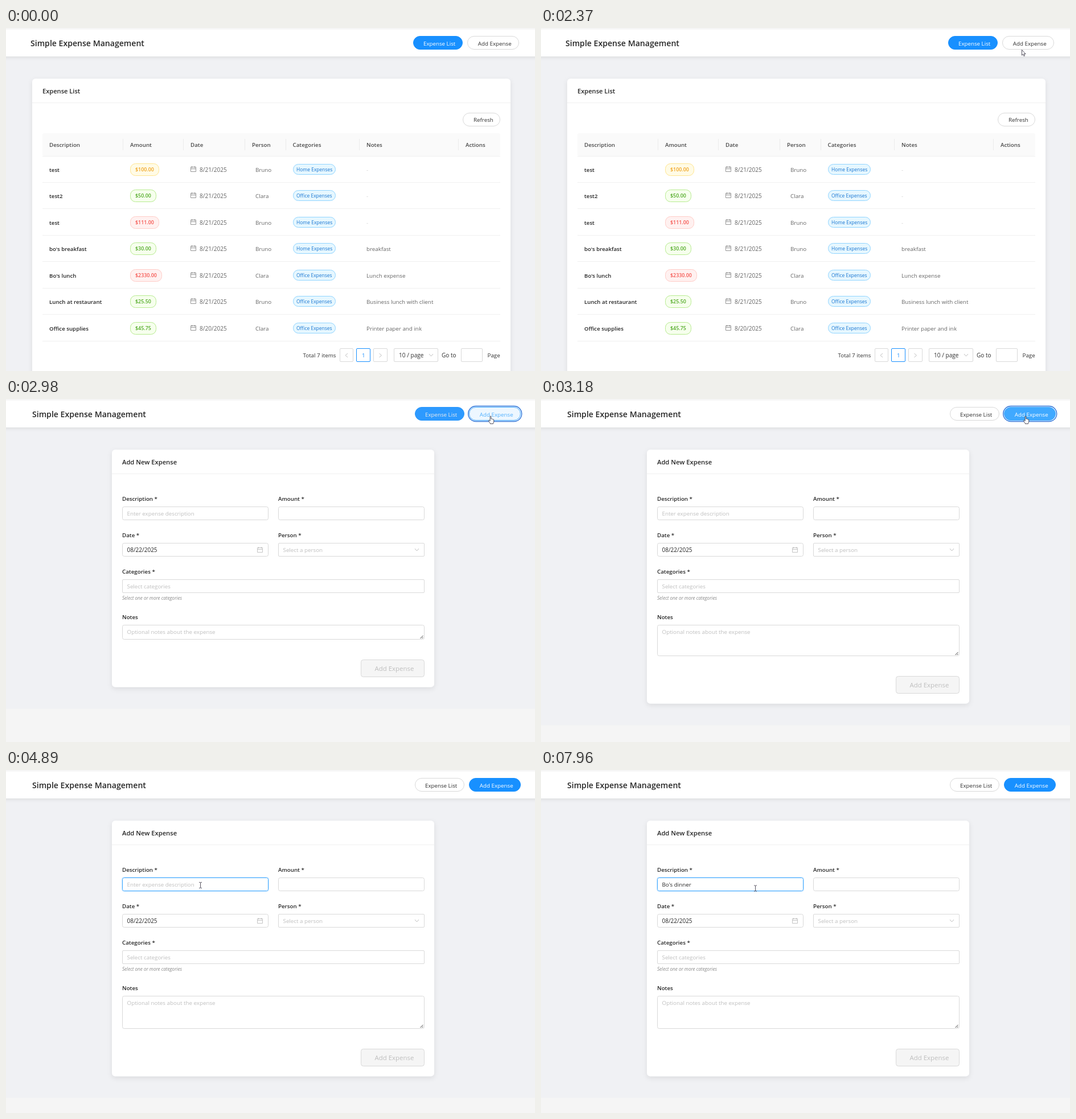
An HTML page for the animation above (8 s loop, 929 px wide and 603 px high).

```html
<!DOCTYPE html>
<html lang="en">
<head>
<meta charset="utf-8">
<title>Simple Expense Management</title>
<style>
html, body { margin: 0; width: 100%; height: 100%; overflow: hidden; background: #f5f5f5; }
svg { display: block; width: 100vw; height: 100vh; }
text { font-family: "Open Sans", "Noto Sans", sans-serif; font-size: 9.8px; white-space: pre; }
.b { font-weight: 600; }
</style>
</head>
<body>
<svg id="stage" viewBox="0 0 929 603" preserveAspectRatio="none"></svg>
<script>
const INK = '#262626', SOFT = '#666', HINT = '#bfbfbf', EDGE = '#d9d9d9';
const BLUE = '#1890ff', LIGHT = '#40a9ff', WHITE = '#ffffff', DARK = '#303030';
const LOOP = 8000, STEP = 200 / 3;

const rect = (x, y, w, h, r, fill, stroke = 'none', more = '') =>
  `<rect x="${x}" y="${y}" width="${w}" height="${h}" rx="${r}" fill="${fill}" stroke="${stroke}" ${more}/>`;
// Outlined box whose one-pixel border sits on whole pixels
const box = (x, y, w, h, r, fill, stroke, more) =>
  rect(x + .5, y + .5, w - 1, h - 1, r, fill, stroke, more);
const text = (x, y, s, fill = INK, size = 9.8, more = '') =>
  `<text x="${x}" y="${y}" fill="${fill}" style="font-size:${size}px" ${more}>${s}</text>`;
const bold = (x, y, s, fill = INK, size = 9.75) => text(x, y, s, fill, size, 'class="b"');
const path = (d, stroke, more = '') => `<path d="${d}" fill="none" stroke="${stroke}" ${more}/>`;
const calendar = (x, y, color) =>
  path(`M${x + .5} ${y + 1.5}h9v8h-9zM${x + .5} ${y + 4.5}h9M${x + 2.5} ${y}v3M${x + 7.5} ${y}v3`, color, 'stroke-width=".9"');
const chevron = (x, y) => path(`M${x} ${y}l3.5 4 3.5-4`, HINT);

// List page
const tones = {
  gold: ['#fffbe6', '#ffe58f', '#f0a422'],
  green: ['#f6ffed', '#b7eb8f', '#4fa823'],
  red: ['#fff1f0', '#ffccc7', '#f5544e']
};
const rows = [
  ['test', '$100.00', 'gold', 'Bruno', '-'],
  ['test2', '$50.00', 'green', 'Clara', '-'],
  ['test', '$111.00', 'red', 'Bruno', '-'],
  ["bo's breakfast", '$30.00', 'green', 'Bruno', 'breakfast'],
  ["Bo's lunch", '$2330.00', 'red', 'Clara', 'Lunch expense'],
  ['Lunch at restaurant', '$25.50', 'green', 'Bruno', 'Business lunch with client'],
  ['Office supplies', '$45.75', 'green', 'Clara', 'Printer paper and ink']
];
const columns = [[76, 'Description'], [218, 'Amount'], [324, 'Date'], [432, 'Person'],
  [503.5, 'Categories'], [633, 'Notes'], [807, 'Actions']];

function row([name, amount, tone, person, note], i) {
  const y = Math.round(248.8 + 46.5 * i), base = y + 4;
  const [bg, edge, ink] = tones[tone];
  const home = i === 0 || i === 2 || i === 3;
  const day = i === 6 ? '8/20/2025' : '8/21/2025';
  return bold(76, base, name, INK, 9.7)
    + box(218, y - 11, 16 + 5 * amount.length, 22, 9, bg, edge)
    + text(227, y + 3, amount, ink, 8.9, 'class="b"')
    + calendar(324, y - 6, '#8c8c8c')
    + text(340, base, day, SOFT, 10.1)
    + text(438, base, person, SOFT)
    + box(504, y - 10, 75, 19, 9, '#e6f7ff', '#91d5ff')
    + text(510, y + 3, (home ? 'Home' : 'Office') + ' Expenses', '#1976d2', 8.48)
    + text(633, base, note, note === '-' ? '#d0d0d0' : SOFT)
    + path(`M64 ${y + 22.5}H868`, '#f0f0f0');
}

function listPage() {
  return rect(46, 89, 840, 530, 6, WHITE, 'none', 'filter="url(#cardShadow)"')
    + bold(64, 115, 'Expense List', INK, 11.1)
    + path('M46 131.5H886', '#f0f0f0')
    + box(802, 149, 66, 24, 11.5, WHITE, EDGE)
    + text(821, 165, 'Refresh', DARK)
    + rect(64, 185, 804, 40, 3, '#fafafa')
    + path('M64 225.5H868', '#f0f0f0')
    + columns.map(([x, s]) => bold(x, 209, s, '#4a4a4a')).join('')
    + [205, 311, 419, 491, 620, 794].map(x => path(`M${x + .5} 195V215`, '#ebebeb')).join('')
    + rows.map(row).join('')
    + text(521.5, 579, 'Total 7 items', DARK)
    + box(586, 563, 24, 24, 1.5, WHITE, EDGE)
    + path('M600 572l-4 3.5 4 3.5', HINT)
    + box(615, 563, 25, 24, 1.5, WHITE, BLUE)
    + text(625, 579, '1', BLUE)
    + box(645, 563, 25, 24, 1.5, WHITE, EDGE)
    + path('M655.5 572l4 3.5-4 3.5', HINT)
    + box(681, 563, 78, 24, 1.5, WHITE, EDGE)
    + text(690, 579, '10 / page', DARK, 10.1)
    + chevron(743, 573)
    + text(765, 579, 'Go to', DARK, 10)
    + box(799, 563, 38, 24, 1.5, WHITE, EDGE)
    + text(845.5, 579, 'Page', DARK);
}

// Form page
const field = (x, y, w, r, more = '') => box(x, y, w, 24, r, WHITE, EDGE, more);

function formPage() {
  return rect(186, 89, 566, 449, 6, WHITE, 'none', 'id="card" filter="url(#cardShadow)"')
    + bold(204, 115, 'Add New Expense', INK, 11.2)
    + path('M186 131.5H752', '#f0f0f0')
    + bold(204, 179, 'Description *') + bold(478, 179, 'Amount *')
    + bold(204, 243, 'Date *') + bold(478, 243, 'Person *')
    + bold(204, 307, 'Categories *') + bold(204, 387, 'Notes')
    + rect(203.5, 188.5, 258, 25, 3.5, 'none', BLUE, 'id="glow"')
    + field(204, 189, 257, 3, 'id="desc"') + field(478, 189, 257, 3)
    + text(212.5, 205, 'Enter expense description', HINT, 9.75, 'id="empty"')
    + text(212.5, 205, '', INK, 9.8, 'id="typed"')
    + rect(0, 195, 1, 13, 0, '#111', 'none', 'id="caret"')
    + field(204, 253, 257, 3) + field(478, 253, 257, 1.5)
    + text(212.5, 269, '08/22/2025', INK, 10)
    + calendar(441, 260, HINT)
    + text(486.5, 269, 'Select a person', HINT)
    + chevron(718, 263)
    + field(204, 317, 531, 1.5)
    + text(212.5, 333, 'Select categories', HINT)
    + text(204, 353, 'Select one or more categories', '#8c8c8c', 8.15, 'font-style="italic"')
    + box(204, 397, 531, 57, 3, WHITE, EDGE, 'id="notes"')
    + text(212.5, 413, 'Optional notes about the expense', HINT)
    + '<g id="below">' + path('M727.5 -2l5-5M730.5 -2l2-2', '#444')
    + box(623, 35, 112, 31, 4, '#f5f5f5', EDGE)
    + text(647.5, 55, 'Add Expense', HINT, 11.45) + '</g>';
}

const stage = document.getElementById('stage');
stage.innerHTML = `<defs>
  <filter id="cardShadow" x="-10%" y="-10%" width="120%" height="120%">
    <feDropShadow dx="0" dy="3" stdDeviation="4.5" flood-opacity=".09"/></filter>
  <filter id="barShadow" x="-5%" y="-30%" width="110%" height="180%">
    <feDropShadow dx="0" dy="1.5" stdDeviation="3" flood-opacity=".1"/></filter></defs>`
  + rect(0, 0, 929, 603, 0, '#f5f5f5')
  + rect(0, 0, 929, 603, 0, '#f0f1f4', 'none', 'id="back"')
  + `<g id="list">${listPage()}</g><g id="form">${formPage()}</g>`
  + rect(-20, -20, 969, 70, 0, WHITE, 'none', 'filter="url(#barShadow)"')
  + path('M0 1.5H929', '#e9e9e9')
  + '<g id="bar">' + bold(43, 32, 'Simple Expense Management', INK, 14.08)
  + rect(808.7, 12.5, 94, 27, 13.5, WHITE, '#2f74d8', 'id="ring" stroke-width="1.4"')
  + box(715, 14, 87, 24, 11.5, BLUE, BLUE, 'id="listBtn"')
  + text(733, 30.5, 'Expense List', WHITE, 9.75, 'id="listTxt"')
  + box(810, 14, 91, 24, 11.5, WHITE, EDGE, 'id="addBtn"')
  + text(828.7, 30.5, 'Add Expense', DARK, 9.8, 'id="addTxt"') + '</g>'
  + `<g id="cursor" stroke-linejoin="round" stroke="#2b2838" stroke-width=".8" fill="#fff">
    <path id="arrow" d="M.4 .4V10L2.6 8.1 4 11.4 5.6 10.7 4.2 7.5H7Z"/>
    <path id="hand" d="M-.9 .6Q0-.7 .9 .6V5Q2 4.2 2.6 5.4 3.7 4.7 4.2 5.9 5.6 5.4 5.7 7V9.6Q5.6 11 4.6 12.2V13.6H-.8V12.4L-3.6 8.6Q-3.8 7-2.4 7.3L-.9 8.6Z"/>
    <path id="beam" fill="none" d="M-2.5-5H-.8L0-4.5 .8-5H2.5M0-4.5V4.5M-2.5 5H-.8L0 4.5 .8 5H2.5"/></g>`;

const el = {};
stage.querySelectorAll('[id]').forEach(n => el[n.id] = n);
const set = (n, attrs) => { for (const k in attrs) n.setAttribute(k, attrs[k]); };
const show = (n, on) => n.setAttribute('visibility', on ? 'visible' : 'hidden');

// Timing
const ramp = (t, a, b) => Math.min(1, Math.max(0, (t - a) / (b - a)));
const smooth = p => p * p * (3 - 2 * p);
const ease = p => p < .5 ? 4 * p ** 3 : 1 - (2 - 2 * p) ** 3 / 2;
const during = (t, a, b) => t >= a && t < b;
function mix(a, b, p) {
  const at = (c, i) => parseInt(c.slice(i, i + 2), 16);
  return `rgb(${[1, 3, 5].map(i => Math.round(at(a, i) + (at(b, i) - at(a, i)) * p))})`;
}

const track = [[630, 837, 321], [690, 832, 181], [900, 832, 181], [1296, 766, 26], [2030, 766, 26],
  [2230, 803, 38.5], [2363, 844, 38], [2520, 851, 41], [2830, 851, 30], [3740, 851, 30],
  [4120, 640, 140], [4360, 372, 231], [4490, 341.5, 202.5], [7700, 341.5, 202.5], [7950, 376.5, 208]];

function pointer(t) {
  const i = track.findIndex(k => k[0] > t);
  if (i < 0) return track[track.length - 1].slice(1);
  const a = track[Math.max(0, i - 1)], b = track[i];
  const p = smooth(ramp(t, a[0], b[0]));
  return [a[1] + (b[1] - a[1]) * p, a[2] + (b[2] - a[2]) * p];
}

function kindAt(x, y, form) {
  const inside = (l, t, r, b) => x > l && x < r && y > t && y < b;
  if (inside(715, 14, 802, 38) || inside(811, 14, 904, 38)) return 'hand';
  if (!form && inside(803, 149, 868, 173)) return 'hand';
  if (form && (inside(204, 189, 460, 213) || inside(478, 189, 734, 213))) return 'beam';
  return 'arrow';
}

const message = "Bo's dinner";
const keys = [5090, 5220, 5830, 5900, 6030, 6430, 6570, 6770, 6900, 7030, 7160];

function draw(t) {
  const q = 630 + Math.floor((t - 625) / STEP) * STEP;
  const form = t >= 2975;
  show(el.list, !form);
  set(el.form, { display: form ? 'inline' : 'none' });
  set(el.bar, { transform: `translate(${form ? 3 : 0})` });

  // Textarea growth moves everything under it
  const bottom = Math.round(422.5 + 32 * ease(ramp(q, 2945, 3245)));
  set(el.notes, { height: bottom - 398 });
  set(el.below, { transform: `translate(0 ${bottom})` });
  set(el.card, { height: bottom + 83.5 - 89 });
  set(el.back, { height: form ? bottom + 121.5 : 603 });

  // Header buttons
  const swap = ramp(q, 2945, 3145);
  const listHover = ramp(q, 1130, 1290) - ramp(q, 2080, 2300);
  const addHover = ramp(q, 2540, 2740), addLeave = ramp(q, 3790, 4000);
  const listFill = mix(BLUE, LIGHT, listHover);
  set(el.listBtn, {
    fill: swap ? mix(BLUE, WHITE, swap) : listFill,
    stroke: swap ? mix(BLUE, EDGE, swap) : listFill
  });
  set(el.listTxt, { fill: mix(WHITE, DARK, swap) });
  const active = mix(LIGHT, BLUE, addLeave);
  set(el.addBtn, {
    fill: swap < 1 ? mix(WHITE, LIGHT, swap) : active,
    stroke: swap < 1 ? mix(EDGE, LIGHT, addHover) : active
  });
  set(el.addTxt, { fill: swap ? mix(LIGHT, WHITE, swap) : mix(DARK, LIGHT, addHover) });
  show(el.ring, during(t, 2905, 4545));

  // Description field
  const focus = ramp(t, 4480, 4620);
  set(el.desc, { stroke: mix(EDGE, LIGHT, focus) });
  set(el.glow, { 'stroke-opacity': .2 * focus });
  const typed = message.slice(0, keys.filter(k => t >= k).length);
  if (el.typed.textContent !== typed) el.typed.textContent = typed;
  el.empty.setAttribute('opacity', typed ? 0 : 1);
  set(el.caret, {
    x: Math.round(212.5 + (typed ? el.typed.getComputedTextLength() : 0)),
    opacity: during(t, 4620, 4890) || during(t, 5090, 5700) || during(t, 5830, 7690) ? 1 : 0
  });

  // Mouse pointer
  const [x, y] = pointer(q);
  const kind = kindAt(x, y, form);
  set(el.cursor, { transform: `translate(${x} ${y})` });
  for (const k of ['arrow', 'hand', 'beam']) show(el[k], t >= 630 && k === kind);
}

function tick() {
  draw(performance.now() % LOOP);
  requestAnimationFrame(tick);
}
tick();
</script>
</body>
</html>
```
